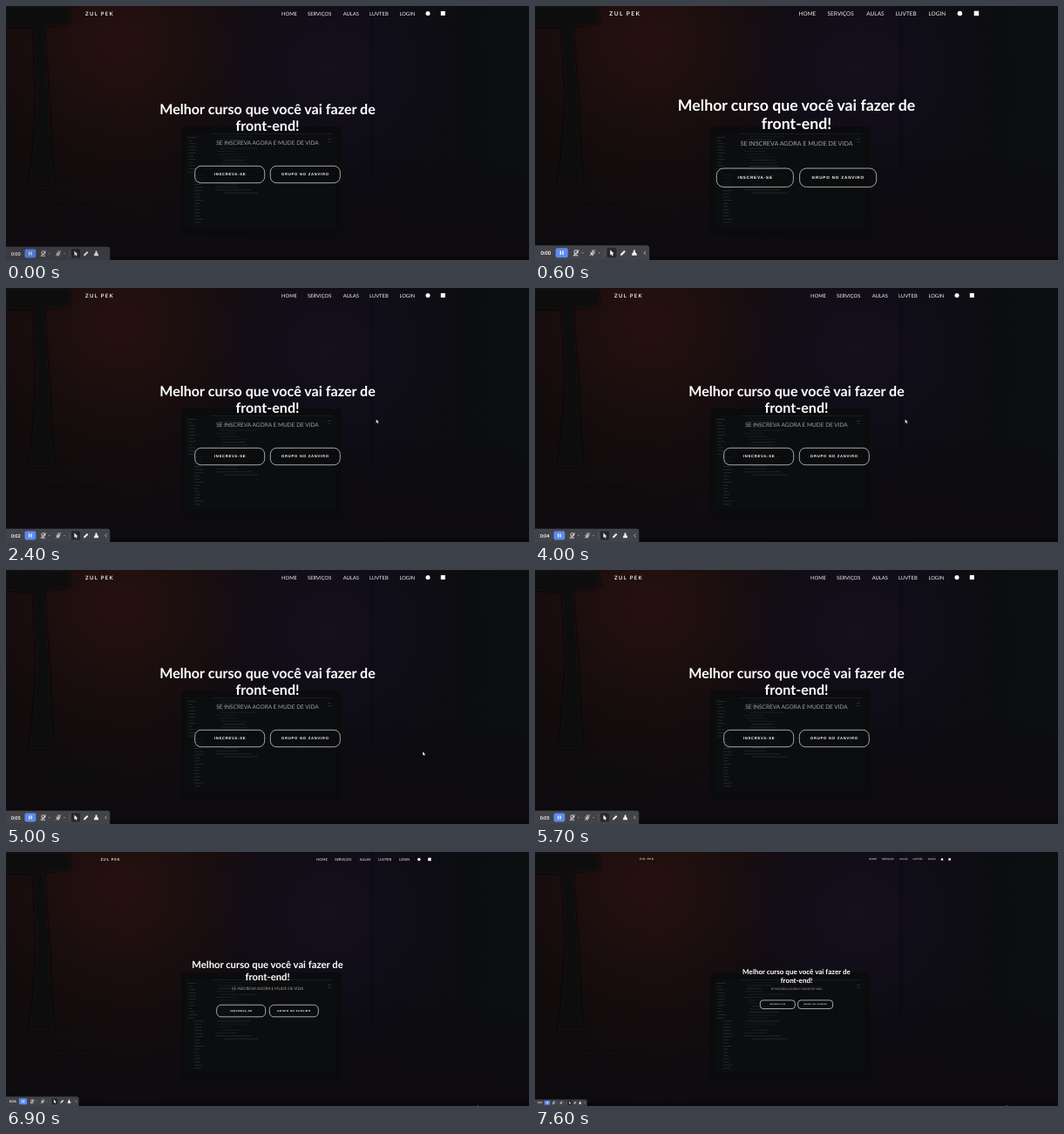
An HTML page for the animation above (8000 ms loop, 600 px wide and 291 px high).

```html
<!DOCTYPE html>
<html lang="pt-BR">
<head>
<meta charset="utf-8">
<title>Curso de front-end</title>
<style>
  html, body { margin: 0; width: 100%; height: 100%; overflow: hidden; background: #0d0b0e; }
  svg { display: block; width: 600px; height: 291px; }
  text { font-family: Lato, sans-serif; fill: #fff; text-rendering: geometricPrecision; white-space: pre; }
  .mid { text-anchor: middle; }
  .brand { font-weight: 700; font-size: 6px; letter-spacing: 1.3px; fill: #eee; }
  .nav { font-size: 5.85px; fill: #f2f2f2; }
  .title { font-weight: 700; font-size: 16.1px; }
  .sub { font-size: 6.5px; fill: #a3a2a4; }
  .btn text { font: 700 4.2px "Liberation Sans", Arial, sans-serif; letter-spacing: .75px; }
  .btn rect { fill: #0b0b0d; fill-opacity: .55; stroke: #d8d8d8; stroke-width: .75; vector-effect: non-scaling-stroke; }
  #clock { font-weight: 700; font-size: 5.4px; }
  .ico { fill: none; stroke: #e6e6e8; stroke-width: .9; stroke-linecap: round; stroke-linejoin: round; }
  .solid { fill: #f4f4f6; }
</style>
</head>
<body>
<svg viewBox="0 0 600 291">
  <defs>
    <linearGradient id="base">
      <stop offset="0" stop-color="#110b0c"/>
      <stop offset=".25" stop-color="#140c0d"/>
      <stop offset=".5" stop-color="#0f0c11"/>
      <stop offset=".7" stop-color="#0d0c13"/>
      <stop offset="1" stop-color="#0c0e10"/>
    </linearGradient>
    <radialGradient id="warm">
      <stop offset="0" stop-color="#2a1210" stop-opacity=".8"/>
      <stop offset="1" stop-color="#2a1210" stop-opacity="0"/>
    </radialGradient>
    <radialGradient id="violet">
      <stop offset="0" stop-color="#15101f" stop-opacity=".9"/>
      <stop offset="1" stop-color="#15101f" stop-opacity="0"/>
    </radialGradient>
    <linearGradient id="floor" x2="0" y2="1">
      <stop offset="0" stop-color="#0d0b0e" stop-opacity="0"/>
      <stop offset="1" stop-color="#0e0b0f"/>
    </linearGradient>
    <filter id="soft"><feGaussianBlur stdDeviation="1.6"/></filter>
  </defs>

  <rect width="600" height="291" fill="url(#base)"/>
  <ellipse cx="130" cy="40" rx="170" ry="150" fill="url(#warm)"/>
  <ellipse cx="370" cy="70" rx="150" ry="130" fill="url(#violet)"/>
  <g filter="url(#soft)">
    <path d="M0 0H72L75 19Q40 27 0 24Z" fill="#0e090a"/>
    <path d="M31 24H44L50 110Q51 170 56 205H26Q34 150 34 100Z" fill="#0c0809"/>
    <ellipse cx="76" cy="237" rx="48" ry="9" fill="#0e090a"/>
    <path d="M420 0V200" stroke="#0a0a0f"/>
  </g>
  <rect y="170" width="600" height="121" fill="url(#floor)"/>
  <rect x="201" y="138" width="184" height="126" rx="5" fill="#0b0b0d"/>
  <rect x="206" y="146" width="172" height="108" fill="#0b0d0f"/>
  <g id="code" fill="#8fa39f"></g>
  <rect y="287" width="600" height="4" fill="#09080a" opacity=".7"/>

  <g id="brand"><text class="brand" x="-58" y="2.2">ZUL PEK</text></g>
  <g id="menu">
    <circle cx="34" cy="0" r="2.5" fill="#fff"/>
    <rect x="48.8" y="-2.5" width="5" height="5" fill="#fff"/>
  </g>

  <g id="hero">
    <text class="title mid" y="-32.8">Melhor curso que você vai fazer de</text>
    <text class="title mid" y="-13.6">front-end!</text>
    <text class="sub mid" y="2.9">SE INSCREVA AGORA E MUDE DE VIDA</text>
    <g class="btn">
      <rect x="-83.3" y="26.9" width="80" height="19.4" rx="7"/>
      <rect x="3.3" y="26.9" width="80" height="19.4" rx="7"/>
      <text class="mid" x="-43" y="38.1">INSCREVA-SE</text>
      <text class="mid" x="43.4" y="38.1">GRUPO NO ZANVIRO</text>
    </g>
  </g>

  <g id="bar">
    <path d="M0 -15.2H116.5Q119.3 -15.2 119.3 -12.4V0H0Z" fill="#424349"/>
    <text id="clock" class="mid" x="11.2" y="-5.5">0:00</text>
    <rect x="21.5" y="-12.4" width="12.8" height="9.8" rx="1.8" fill="#5b8bf0"/>
    <path class="solid" d="M26 -9.6h1.3v4.2h-1.3zM28.5 -9.6h1.3v4.2h-1.3z"/>
    <circle class="ico" cx="42.8" cy="-8.3" r="2"/>
    <path class="ico" d="M41 -4.7H44.6M40.2 -4.6L45.6 -10.4"/>
    <path class="ico" d="M60 -10.3V-7.6M58 -8Q58 -5.8 60 -5.8T62 -8M60 -5.8V-4.6M57.6 -4.8L62.6 -10.4"/>
    <path d="M49 -7.4h1.4M66.3 -7.4h1.4" stroke="#aaabb0" stroke-width=".9"/>
    <path d="M72.8 -11.5V-3.5" stroke="#65666c" stroke-width=".6"/>
    <rect x="75" y="-12.4" width="10" height="9.8" rx="1.5" fill="#26272b"/>
    <path class="solid" d="M78.4 -10.6V-4.9L79.7 -6L80.6 -4.2L81.6 -4.7L80.7 -6.4L82.4 -6.6Z"/>
    <path class="solid" d="M89 -4.6L89.5 -6.5L93 -10L94.4 -8.6L90.9 -5.1Z"/>
    <path class="solid" d="M102.8 -10.5H104.2L104.8 -7.6H105.6L106.2 -4.7H100.9L101.5 -7.6H102.3Z"/>
    <path id="chevron" class="ico" d="M115.2 -9L113.8 -7.4L115.2 -5.8" stroke-opacity=".7"/>
  </g>

  <path id="cursor" d="M0 0V4.4L1.1 3.5L1.9 5L2.7 4.6L2 3.2H3.4Z" fill="#fff" stroke="#111" stroke-width=".3"/>
</svg>

<script>
const LOOP = 8000, STEP = 100;
const $ = id => document.getElementById(id);

function add(parent, tag, attrs, text = '') {
  const el = document.createElementNS('http://www.w3.org/2000/svg', tag);
  for (const k in attrs) el.setAttribute(k, attrs[k]);
  el.textContent = text;
  parent.append(el);
}

// offsets are relative to the menu anchor
[['HOME', -134], ['SERVIÇOS', -104], ['AULAS', -63.3], ['LUVTEB', -33], ['LOGIN', 1.4]]
  .forEach(([label, x]) => add($('menu'), 'text', { class: 'nav', x, y: 2.1 }, label));

// faint editor on the laptop screen
let seed = 7;
const rand = () => (seed = seed * 16807 % 2147483647) / 2147483647;
const dash = (x, y, width, opacity) => add($('code'), 'rect', { x, y, width, height: 1, opacity });
dash(236, 146, 138, .1);
for (let y = 150; y < 250; y += 3.6)
  dash(208 + (y > 190 ? 8 : 2 * rand()), y, 4 + 7 * rand(), .17);
for (let y = 149; y < 217; y += 3.4)
  dash(240 + Math.floor(rand() * 4) * 3, y, 10 + 34 * rand(), .06 + .12 * rand());
add($('code'), 'path', { d: 'M341 148V250', stroke: '#15191b', 'stroke-width': .6 });
dash(369, 152, 4, .22);
dash(369, 155, 4, .16);

// [ms, page zoom]
const zooms = [[0, 1], [300, 1.1], [2400, 1], [6800, .8], [6900, .7], [7400, .6], [7500, .5]];
// [ms, x, y]; y past the stage hides the pointer
const path = [[0, 425, 300], [2399, 425, 300], [2400, 424.6, 150.4], [4600, 424.6, 150.4],
  [5000, 478, 208], [5400, 560, 289], [5600, 561, 293], [5900, 552, 293],
  [6100, 542, 289.8], [6600, 541, 290], [8000, 541, 290]];

const zoomAt = t => zooms.filter(z => z[0] <= t).pop()[1];

function pointerAt(t) {
  const i = Math.max(1, path.findIndex(p => p[0] > t));
  const [t0, x0, y0] = path[i - 1], [t1, x1, y1] = path[i];
  const k = (t - t0) / (t1 - t0);
  return [x0 + (x1 - x0) * k, y0 + (y1 - y0) * k];
}

const place = (id, x, y, s = 1) =>
  $(id).setAttribute('transform', `translate(${x} ${y}) scale(${s})`);

function draw() {
  const t = Math.floor(performance.now() % LOOP / STEP) * STEP;
  const z = zoomAt(t);
  place('brand', 149, 8.3, z);
  place('menu', 450, 8.4, z);
  place('hero', 300, 156.4, z);
  place('bar', 0, 291, z);
  place('cursor', ...pointerAt(t));
  $('clock').textContent = '0:0' + Math.floor(t / 1000);
  $('bar').setAttribute('opacity', t ? 1 : .85);
  $('chevron').setAttribute('visibility', t ? 'visible' : 'hidden');
  requestAnimationFrame(draw);
}
draw();
</script>
</body>
</html>
```
